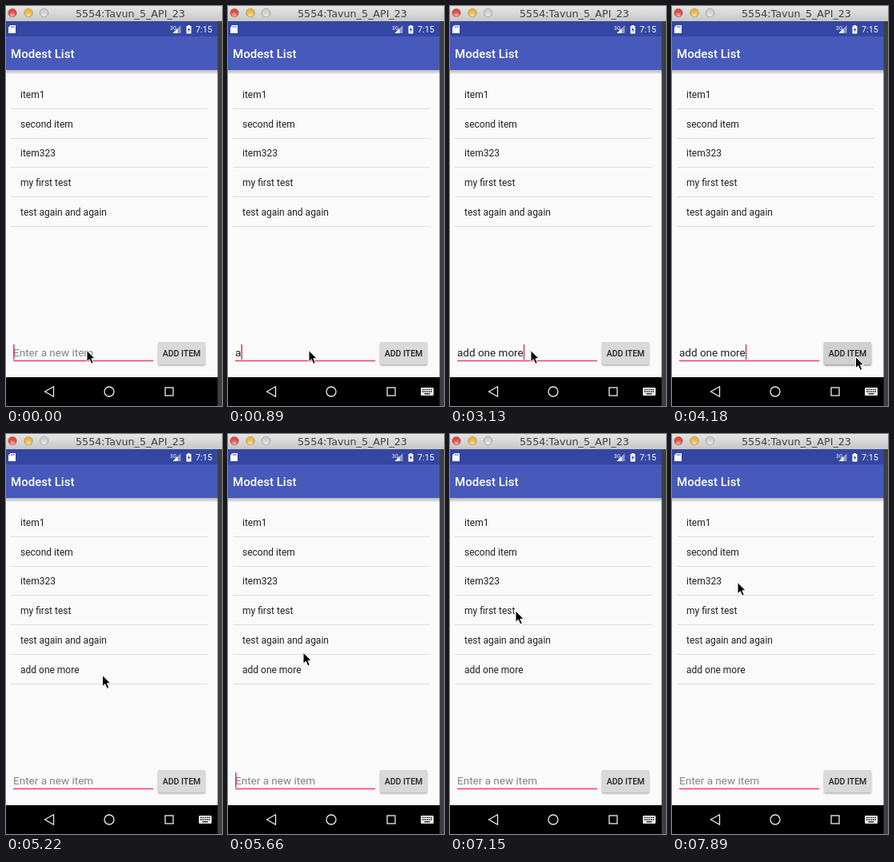
Write an HTML page that moves like this. It is 270 by 500 pixels and loops after 8000 ms.

```html
<!DOCTYPE html>
<html lang="en">
<head>
<meta charset="utf-8">
<title>Todo list in an emulator</title>
<style>
  html, body { margin: 0; width: 100%; height: 100%; overflow: hidden; background: #000; }
  svg { display: block; width: 270px; height: 500px; font-family: Roboto, sans-serif; }
  text { white-space: pre; fill: #212121; }
  .window { font: 12.7px "DejaVu Sans", sans-serif; fill: #404040; }
  .bar { font-size: 15px; font-weight: 500; fill: #fff; }
  .item { font-size: 12px; }
  .field { font-size: 13.5px; }
  .hint { fill: #858585; }
  .button { font-size: 10.5px; font-weight: 500; }
  .nav { fill: none; stroke: #eee; stroke-width: 1.3; }
</style>
</head>
<body>
<svg viewBox="0 0 270 500">
  <defs>
    <linearGradient id="chrome" x2="0" y2="1">
      <stop stop-color="#e6e6e6"/><stop offset="1" stop-color="#c6c6c6"/>
    </linearGradient>
    <linearGradient id="shade" x2="0" y2="1">
      <stop stop-color="#b9b9bd"/><stop offset=".6" stop-color="#d6d6d6"/><stop offset="1" stop-color="#f4f4f4"/>
    </linearGradient>
    <radialGradient id="gloss" cy=".85">
      <stop stop-color="#fff" stop-opacity=".6"/><stop offset="1" stop-color="#fff" stop-opacity="0"/>
    </radialGradient>
    <filter id="soft" x="-20%" y="-20%" width="140%" height="160%"><feGaussianBlur stdDeviation="1"/></filter>
  </defs>

  <!-- window frame -->
  <rect width="270" height="19.5" fill="url(#chrome)"/>
  <g stroke="#777" stroke-opacity=".6" stroke-width=".8">
    <circle cx="8" cy="8.5" r="5.3" fill="#e2493f"/>
    <circle cx="28" cy="8.5" r="5.3" fill="#eeb43c"/>
    <circle cx="47.5" cy="8.5" r="5.3" fill="#cfcfcf"/>
  </g>
  <g fill="url(#gloss)">
    <circle cx="8" cy="8.5" r="5"/><circle cx="28" cy="8.5" r="5"/><circle cx="47.5" cy="8.5" r="5"/>
  </g>
  <text class="window" x="87" y="14">5554:Tavun_5_API_23</text>

  <!-- app -->
  <rect y="19" width="265" height="445" fill="#fafafa"/>
  <rect y="19" width="265" height="19" fill="#3446a2"/>
  <rect y="38" width="265" height="42" fill="#475abb"/>
  <rect y="80" width="265" height="5" fill="url(#shade)"/>
  <path d="M5.5 24H12v10H3v-7.5z" fill="#fff"/>
  <path d="M6.5 25v2M8.3 25v2M10.1 25v2" stroke="#3446a2" stroke-width=".8"/>
  <text x="205" y="30" font-size="6.5" style="fill:#fff">3G</text>
  <path d="M218.5 24v10h-10z" fill="#fff" fill-opacity=".45"/>
  <path d="M214.5 28v6h-6z" fill="#fff"/>
  <path d="M227 24h3v1h1.5v9.5h-6V25H227z" fill="#fff"/>
  <path d="M229 26.5l-2 3.5h1.3v2.7l2-3.6H229z" fill="#3446a2"/>
  <text x="237" y="33" font-size="10.8" style="fill:#fff">7:15</text>
  <text class="bar" x="6" y="65">Modest List</text>

  <g id="list"></g>

  <text id="field" class="field" x="9" y="438"></text>
  <rect x="9" y="442.7" width="175" height="1.6" fill="#f0447c"/>
  <rect id="caret" y="423" width="1.6" height="19" fill="#e23f76"/>

  <rect id="shadow" x="190" y="421.5" width="59" height="28" rx="1.5" fill="#000" filter="url(#soft)"/>
  <rect id="face" x="190" y="420" width="59" height="28" rx="1.5"/>
  <text class="button" x="219.5" y="438" text-anchor="middle">ADD ITEM</text>

  <!-- navigation -->
  <rect y="464" width="265" height="36"/>
  <path class="nav" d="M48.5 482l11-6.2v12.4z"/>
  <circle class="nav" cx="129" cy="482" r="6"/>
  <rect class="nav" x="199" y="477" width="10" height="10"/>
  <g id="keyboard">
    <rect x="241" y="477" width="16" height="10" rx="1.3" fill="#eee"/>
    <path d="M243 479.4h12M243 482h12" stroke="#000" stroke-width="1.3" stroke-dasharray="1.5 1.1"/>
    <path d="M245.5 484.8h7" stroke="#000" stroke-width="1.2"/>
  </g>

  <!-- emulator toolbar -->
  <rect x="264.5" y="19" width="5.5" height="481" fill="#3d3f41"/>

  <path id="mouse" d="M0 0V14.2L3.3 11.2L5.7 16.8L8.3 15.7L5.9 10.2H10.2Z"
        stroke="#fff" stroke-width="1" stroke-linejoin="round"/>
</svg>
<script>
const LOOP = 8000, HINT = "Enter a new item", ADDED = 4320;
const $ = id => document.getElementById(id);

const rows = ["item1", "second item", "item323", "my first test", "test again and again", "add one more"];
$("list").innerHTML = rows.map((label, i) => {
  const y = 114.8 + i * 36.75;
  return `<g><text class="item" x="18" y="${y}">${label}</text>
    <rect x="6" y="${Math.round(y + 13)}" width="246" height="1" fill="#dedede"/></g>`;
}).join("");
const newRow = $("list").lastElementChild;

// Each track lists [start time, value]; values hold until the next entry.
const typed = [
  [0, ""], [890, "a"], [1190, "ad"], [1490, "add"], [1790, "add "],
  [2240, "add o"], [2390, "add on"], [2540, "add one"], [2690, "add one "],
  [2830, "add one m"], [2980, "add one mor"], [3130, "add one more"], [ADDED, ""]
];
const caretOn = [
  [0, true], [740, false], [890, true], [3730, false], [4180, true], [4770, false],
  [5370, true], [5810, false], [6260, true], [6850, false], [7300, true], [7740, false]
];
const mouse = [
  [0, [101, 430.5]], [3280, [101, 431]], [3580, [233, 466]], [3730, [229.5, 438.5]],
  [4770, [227, 428]], [4920, [186, 373]], [5070, [142, 325]], [5220, [120.5, 301.5]],
  [5370, [106, 286]], [5520, [94, 273]], [5670, [85, 264]], [5810, [80, 259]],
  [6410, [85, 251]], [6560, [89, 241]], [6700, [86, 231]], [6850, [82, 226]],
  [7150, [82, 221]], [7300, [82, 213]], [7450, [82, 203]], [7600, [82, 194]],
  [7740, [82, 188]], [7890, [82, 185.5]]
];

const at = (track, t) => track.findLast(([start]) => start <= t)[1];
const show = (el, on) => el.setAttribute("visibility", on ? "visible" : "hidden");

function draw(t) {
  const text = at(typed, t), field = $("field");
  const label = text || HINT;
  if (field.textContent !== label) {
    field.textContent = label;
    field.classList.toggle("hint", !text);
  }
  $("caret").setAttribute("x", 9 + (text ? field.getComputedTextLength() : 0));
  show($("caret"), at(caretOn, t));
  show($("keyboard"), t >= 150);
  show(newRow, t >= ADDED);

  const pressed = t >= 4030 && t < ADDED;
  $("face").setAttribute("fill", pressed ? "#d0d0d0" : "#d9d9d9");
  $("shadow").setAttribute("opacity", pressed ? .42 : .3);
  $("mouse").setAttribute("transform", `translate(${at(mouse, t)})`);
}

const begin = performance.now();
function tick() {
  draw((performance.now() - begin) % LOOP);
  requestAnimationFrame(tick);
}
tick();
</script>
</body>
</html>
```
